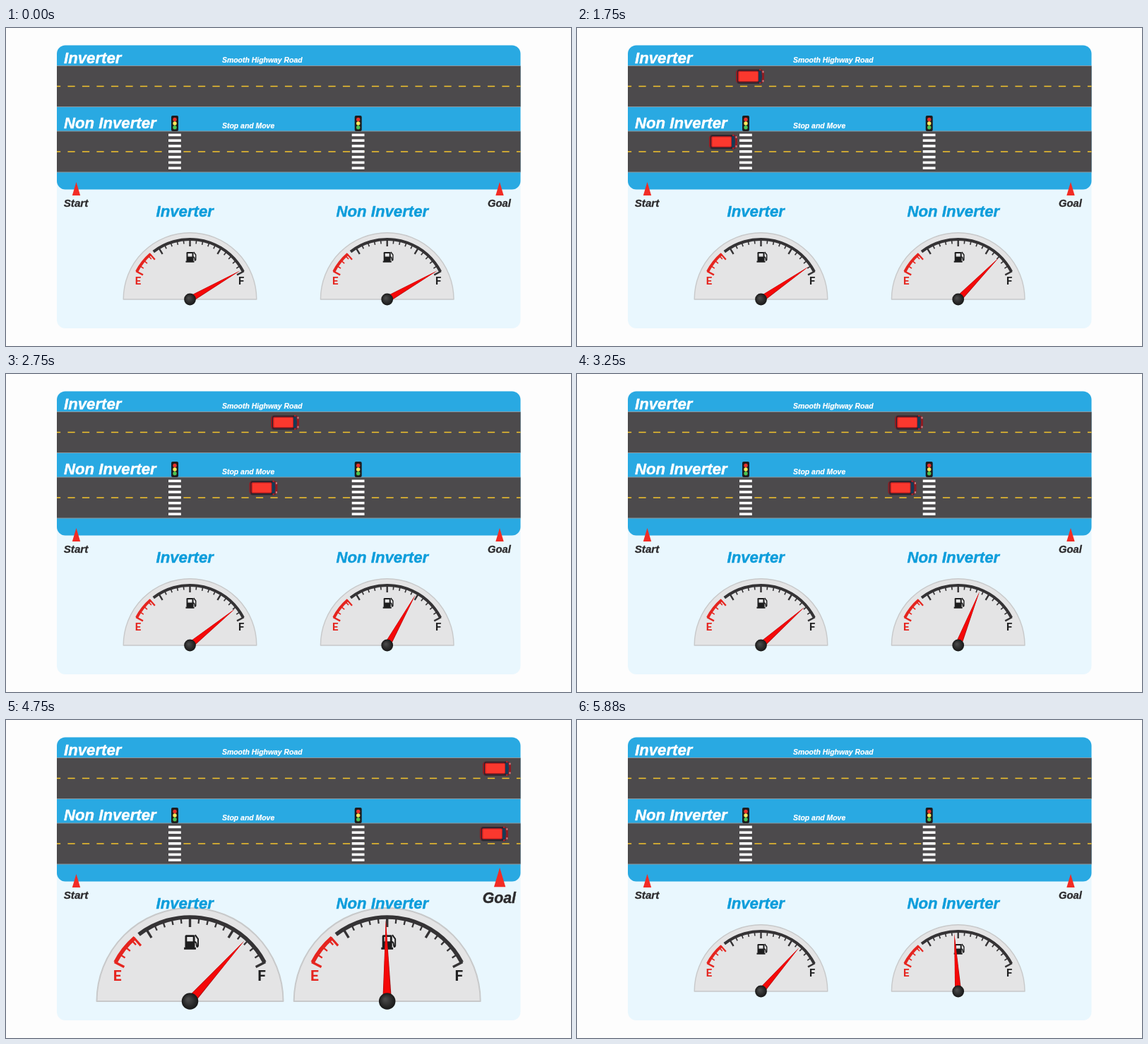
An HTML page with a canvas that plays this animation: 800x450 px, repeating every 6.01 s.

```html
<!DOCTYPE html>
<html lang="en">
<head>
<meta charset="utf-8">
<title>Inverter and Non Inverter</title>
<style>
html, body { margin: 0; width: 100%; height: 100%; overflow: hidden; background: #fdfdfd; }
canvas { display: block; width: 800px; height: 450px; }
</style>
</head>
<body>
<canvas id="stage" width="800" height="450"></canvas>
<script>
const ctx = document.getElementById('stage').getContext('2d');
const LOOP = 6010, STEP = 125;
const DARK = '#353335', RED = '#e5251f', BLUE = '#0d9ddb';
const ROADS = [54, 146.5];
const LIGHTS = [239, 498.7];

const clamp = v => Math.max(0, Math.min(1, v));
const rad = deg => deg * Math.PI / 180;

function rect(x, y, w, h, fill, r = 0) {
  ctx.fillStyle = fill;
  ctx.beginPath();
  ctx.roundRect(x, y, w, h, r);
  ctx.fill();
}

function disc(x, y, r, fill) {
  ctx.fillStyle = fill;
  ctx.beginPath();
  ctx.arc(x, y, r, 0, Math.PI * 2);
  ctx.fill();
}

function poly(points, fill) {
  ctx.fillStyle = fill;
  ctx.beginPath();
  points.forEach(([x, y]) => ctx.lineTo(x, y));
  ctx.closePath();
  ctx.fill();
}

function line(x1, y1, x2, y2, color, width) {
  ctx.strokeStyle = color;
  ctx.lineWidth = width;
  ctx.beginPath();
  ctx.moveTo(x1, y1);
  ctx.lineTo(x2, y2);
  ctx.stroke();
}

// Heavy oblique lettering: bold italic with a thin outline
function label(str, x, y, size, color, align = 'left') {
  ctx.font = `italic bold ${size}px "Liberation Sans", Arial, sans-serif`;
  ctx.textAlign = align;
  ctx.fillStyle = ctx.strokeStyle = color;
  ctx.lineWidth = size * 0.02;
  ctx.lineJoin = 'round';
  ctx.fillText(str, x, y);
  ctx.strokeText(str, x, y);
}

function scaled(x, y, s, draw) {
  ctx.save();
  ctx.translate(x, y);
  ctx.scale(s, s);
  ctx.translate(-x, -y);
  draw();
  ctx.restore();
}

function road(y) {
  rect(72, y - 1, 656.5, 59, '#8b979e');
  rect(72, y, 656.5, 57, '#4c4a4c');
  ctx.setLineDash([10.25, 10.25]);
  ctx.lineDashOffset = 5.1;
  line(72, y + 28.5, 728.5, y + 28.5, '#f3c32c', 1.6);
  ctx.setLineDash([]);
}

function crossing(x) {
  for (let i = 0; i < 7; i++) rect(x - 9, 149.6 + i * 7.8, 17.8, 3.6, '#fff');
  rect(x - 5, 124, 10, 22, '#1c1c1e', 2);
  disc(x, 129.4, 2.7, '#e8322c');
  disc(x, 135, 2.7, '#f8ea5e');
  disc(x, 140.7, 2.7, '#4cc454');
}

function car(x, y) {
  ctx.save();
  ctx.translate(x, y);
  rect(-19, -10, 37, 20.5, 'rgba(25,20,30,.55)', 4);
  rect(-20, -9, 40, 18, '#8e1c22', 4);
  rect(-18, -9, 33, 18, '#26222e', 2.5);
  rect(13, -10.5, 2.5, 2.5, '#b5222a', 1);
  rect(13, 8, 2.5, 2.5, '#b5222a', 1);
  poly([[11, -7], [16, -8.5], [17, 0], [16, 8.5], [11, 7]], '#173b56');
  rect(-17, -7.7, 29, 15.4, '#c5201f', 2);
  rect(-15.5, -6.6, 26.5, 13.2, '#fb382e', 1);
  rect(17.5, -8, 2, 3, '#c9868a', 1);
  rect(17.5, 5, 2, 3, '#c9868a', 1);
  ctx.restore();
}

function marker(x) {
  poly([[x, 218], [x + 5.7, 237], [x - 5.7, 237]], '#f22c25');
}

function dialArc(from, to, color) {
  ctx.strokeStyle = color;
  ctx.lineWidth = 4;
  ctx.beginPath();
  ctx.arc(0, 0, 85, -rad(from), -rad(to));
  ctx.stroke();
}

function tick(deg, len, color, width) {
  const c = Math.cos(rad(deg)), s = -Math.sin(rad(deg));
  line(c * 86, s * 86, c * (84 - len), s * (84 - len), color, width);
}

function pump() {
  rect(-5, -67, 10, 13, '#1d1d1e', 1.2);
  rect(-6, -54.5, 12, 2.2, '#1d1d1e');
  rect(-3, -65, 6, 4.5, '#e4e4e5');
  ctx.strokeStyle = '#1d1d1e';
  ctx.lineWidth = 1.4;
  ctx.beginPath();
  ctx.moveTo(4.5, -60);
  ctx.quadraticCurveTo(6.6, -60, 6.6, -57);
  ctx.quadraticCurveTo(7, -53.5, 8.2, -56);
  ctx.lineTo(8.2, -63);
  ctx.lineTo(5.2, -67);
  ctx.stroke();
}

function needle(deg) {
  ctx.save();
  ctx.rotate(-rad(deg));
  poly([[0, -4.6], [82.5, 0], [0, 4.6]], '#a50d10');
  poly([[0, -4.1], [81, 0], [0, 3.7]], '#f50808');
  ctx.restore();
  const g = ctx.createRadialGradient(-2, -2, 1, 0, 0, 8.5);
  g.addColorStop(0, '#484848');
  g.addColorStop(1, '#171717');
  disc(0, 0, 8.4, g);
}

function gauge(x, deg) {
  ctx.save();
  ctx.translate(x, 384);
  ctx.beginPath();
  ctx.arc(0, 0, 94.3, Math.PI, 0);
  ctx.closePath();
  ctx.fillStyle = '#e4e4e5';
  ctx.fill();
  ctx.strokeStyle = '#c8c9ca';
  ctx.lineWidth = 1.4;
  ctx.lineJoin = 'round';
  ctx.stroke();

  dialArc(152.5, 131, RED);
  dialArc(127.5, 27.5, DARK);
  for (let i = 0; i <= 20; i++) {
    const deg = 27.5 + i * 6.25, major = i % 5 === 0;
    if (i === 16) continue;
    tick(deg, major ? 9 : 5, i > 16 ? RED : DARK, major ? 2.4 : 1.6);
  }
  tick(131.5, 9, RED, 2.2);

  ctx.font = 'bold 15px Roboto, Arial, sans-serif';
  ctx.textAlign = 'center';
  ctx.fillStyle = RED;
  ctx.fillText('E', -73.5, -21);
  ctx.fillStyle = '#1f1f20';
  ctx.fillText('F', 72.5, -21);
  pump();
  needle(deg);
  ctx.restore();
}

const steadyX = t => 152 + 0.15 * (t - 1130);

// Drives up to each crossing, waits, then moves on
function stopGoX(t) {
  if (t < 1930) return Math.min(207, 181 + 0.192 * (t - 1130));
  if (t < 3900) return Math.min(466.5, 207 + 0.192 * (t - 1930));
  return 466.5 + 0.264 * (t - 3900);
}

function draw(t) {
  const burn = clamp((t - 690) / 4250);
  const pulse = 1 + 0.4 * Math.sin(Math.PI * clamp((t - 4500) / 500));

  rect(0, 0, 800, 450, '#fdfdfd');
  rect(72, 24.5, 656.5, 400.5, '#e9f7fe', 12);
  rect(72, 24.5, 656.5, 204, '#29a9e2', 12);
  ROADS.forEach(road);
  LIGHTS.forEach(crossing);

  label('Inverter', 82, 49.7, 22.2, '#fff');
  label('Non Inverter', 82, 142, 22.2, '#fff');
  label('Smooth Highway Road', 306, 49.3, 10.45, '#fff');
  label('Stop and Move', 306, 141.8, 10.45, '#fff');

  ctx.save();
  ctx.beginPath();
  ctx.rect(72, 24, 656.5, 204);
  ctx.clip();
  car(steadyX(t), 68.5);
  car(stopGoX(t), 161);
  ctx.restore();

  marker(99.5);
  label('Start', 99, 252.7, 15.2, '#2c2b2d', 'center');
  scaled(698.7, 239, 1 + (pulse - 1) * 1.08, () => {
    marker(699);
    label('Goal', 698.5, 252.7, 14.8, '#2c2b2d', 'center');
  });

  [[260.5, 19.2], [539.7, 64.1]].forEach(([x, sweep]) =>
    scaled(x, 349, pulse, () => gauge(x, 29.7 + sweep * burn)));
  label('Inverter', 212.5, 266.5, 22.2, BLUE);
  label('Non Inverter', 467.5, 266.5, 22.2, BLUE);
}

// The picture advances eight times a second, on 10 ms ticks
function stepTime(t) {
  const start = k => Math.ceil(k * STEP / 10) * 10;
  let k = Math.min(47, Math.floor(t / STEP));
  if (t < start(k)) k--;
  return start(k);
}

const began = performance.now();
function tickFrame() {
  draw(stepTime((performance.now() - began) % LOOP));
  requestAnimationFrame(tickFrame);
}
tickFrame();
</script>
</body>
</html>
```
